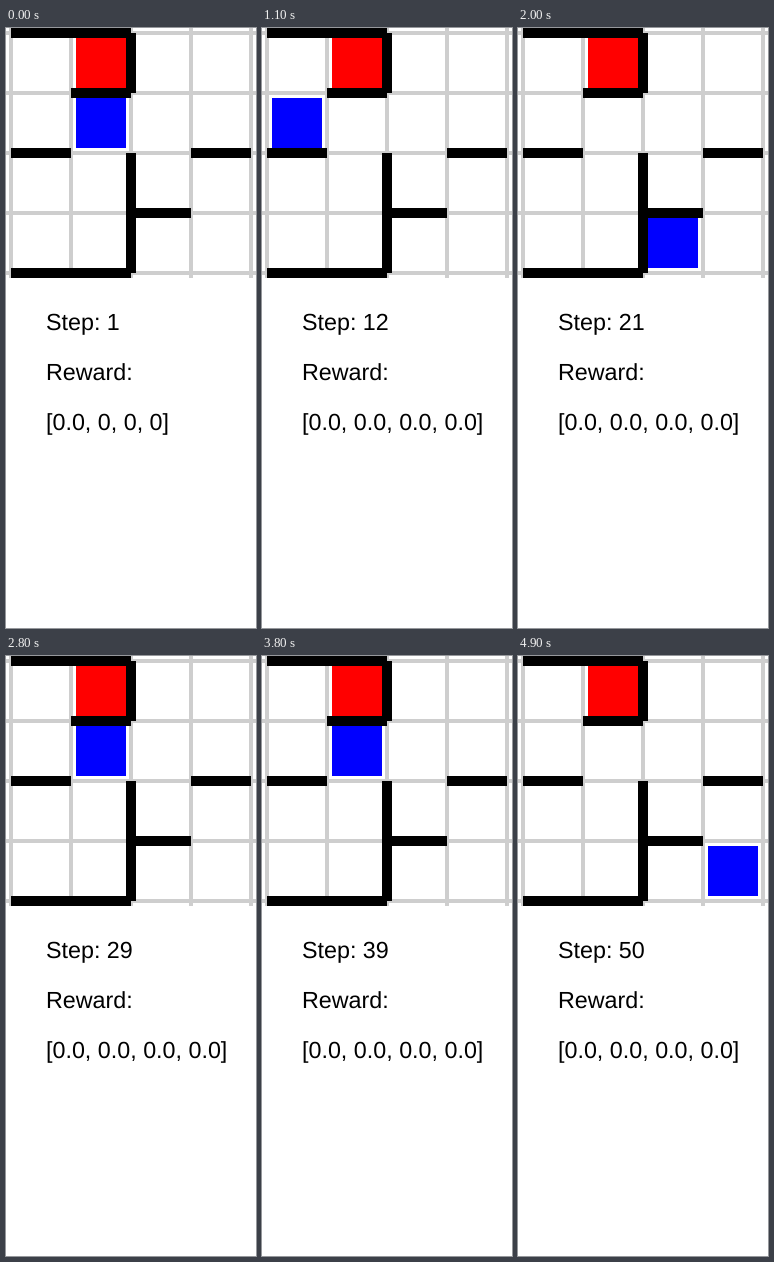
Recreate the animation shown at these times as an HTML page. Size 250x600 px, loop 5 s.

```html
<!DOCTYPE html>
<html>
<head>
<meta charset="utf-8">
<style>
  html, body { margin: 0; width: 100%; height: 100%; overflow: hidden; background: #fff; }
  svg { display: block; }
  text { font: 23.3px "Liberation Sans", Arial, sans-serif; text-rendering: geometricPrecision; }
</style>
</head>
<body>
<svg width="250" height="600" viewBox="0 0 250 600">
  <path stroke="#cecece" stroke-width="4"
    d="M5 0V250M65 0V250M125 0V250M185 0V250M245 0V250M0 5H250M0 65H250M0 125H250M0 185H250M0 245H250"/>
  <path stroke="#000" stroke-width="10"
    d="M5 5H125M5 245H125M125 5V65M65 65H125M5 125H65M185 125H245M125 125V245M125 185H185"/>
  <rect x="70" y="10" width="50" height="50" fill="#f00"/>
  <rect id="agent" width="50" height="50" fill="#00f"/>
  <text id="step" x="40" y="302"></text>
  <text x="40" y="352">Reward:</text>
  <text id="rewards" x="40" y="402"></text>
</svg>
<script>
const $ = id => document.getElementById(id);
const STEP_MS = 100, SIZE = 4;
// One move per step; a dot is a bump against a wall. The board wraps around.
const moves = ".L.U...LD." + "R..ULUL..." + ".DDD.UL.L." + ".R.LL.RRDD" + ".....ULDL";
const dirs = { L: [-1, 0], R: [1, 0], U: [0, -1], D: [0, 1], ".": [0, 0] };
const wrap = n => (n + SIZE) % SIZE;

const path = [[1, 1]];
for (const m of moves) {
  const [x, y] = path[path.length - 1], [dx, dy] = dirs[m];
  path.push([wrap(x + dx), wrap(y + dy)]);
}

let shown = -1;
function draw(time) {
  const i = Math.floor(time / STEP_MS) % path.length;
  if (i === shown) return;
  shown = i;
  const [x, y] = path[i];
  $("agent").setAttribute("x", 10 + 60 * x);
  $("agent").setAttribute("y", 10 + 60 * y);
  $("step").textContent = "Step: " + (i + 1);
  const rewards = Array.from({ length: 4 }, (_, k) => k <= i ? "0.0" : "0");
  $("rewards").textContent = "[" + rewards.join(", ") + "]";
}

draw(0);
const start = performance.now();
requestAnimationFrame(function tick() {
  draw(performance.now() - start);
  requestAnimationFrame(tick);
});
</script>
</body>
</html>
```
